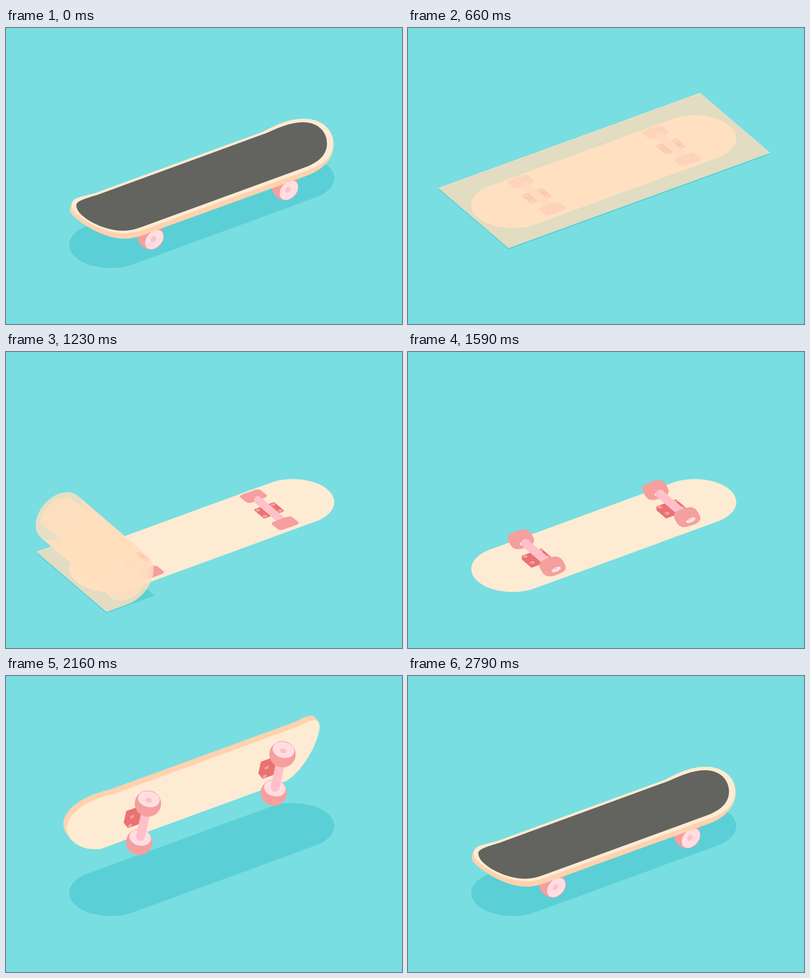
An HTML page that plays this animation: 800x600 px, repeating every 3000 ms.

```html
<!DOCTYPE html>
<html lang="en">
<head>
<meta charset="utf-8">
<title>Skateboard</title>
<style>
html, body { margin: 0; width: 100%; height: 100%; overflow: hidden; background: #78dee1; }
svg { display: block; width: 100vw; height: 100vh; }
</style>
</head>
<body>
<svg id="stage" viewBox="0 0 800 600"></svg>
<script>
const stage = document.getElementById('stage');
const LOOP = 3000;
const SHADE = '#5acfd6', CREAM = '#feebd3', WOOD = '#ffd2ae', GRIP = '#63645f';
const TIRE = '#f59f9f', FACE = '#ffdee3', AXLE = '#ffc0c9', BASE = '#eb7272', SHEET = '#ffe0bf';

// Screen vectors of one board unit: length, width, up
const U = [0.7, -0.257], W = [0.457, 0.392], UP = [0, -0.69];
const CX = 395.5, GROUND = 372, REST = 303, PEAK = 224;

const clamp = v => Math.max(0, Math.min(1, v));
const span = (t, a, b) => clamp((t - a) / (b - a));
const mix = (a, b, k) => a + (b - a) * k;
const sine = p => (1 - Math.cos(Math.PI * p)) / 2;
const cubic = p => p < 0.5 ? 4 * p ** 3 : 1 - 4 * (1 - p) ** 3;
const blend = (a, ka, b, kb) => [a[0] * ka + b[0] * kb, a[1] * ka + b[1] * kb];
const num = v => v.toFixed(2);
const group = (tf, body) => `<g transform="${tf}">${body}</g>`;
const path = (d, fill, more = '') => `<path d="${d}" fill="${fill}" ${more}/>`;
const poly = (pts, fill, more = '') =>
  path('M' + pts.map(p => num(p[0]) + ',' + num(p[1])).join('L') + 'Z', fill, more);
const disc = (c, a, b, r, fill) =>
  `<circle r="${r}" fill="${fill}" transform="matrix(${[...a, ...b, ...c].map(v => v.toFixed(4))})"/>`;

const outline = [];
for (let i = 0; i < 72; i++) {
  const a = (i + 0.5) / 72 * 2 * Math.PI - Math.PI / 2;
  const side = Math.cos(a) > 0 ? 1 : -1;
  outline.push([side * 263 + 100 * Math.cos(a), 100 * Math.sin(a)]);
}

const shadow = () => poly(outline.map(([x, y]) => {
  const v = blend(U, x, W, y);
  return [CX + v[0], GROUND + v[1]];
}), SHADE);

// Wheel body: flat rounded slab at k = 0, round at k = 1
function tire(c, k) {
  const p = [mix(20.5, 25, k), mix(-7.5, -9, k)], q = [mix(10, 9, k), mix(8, 25, k)];
  const e = mix(0.36, 1, k), pts = [];
  const bend = v => Math.sign(v) * Math.abs(v) ** e;
  for (let i = 0; i < 72; i++) {
    const a = i / 72 * 2 * Math.PI;
    const v = blend(p, bend(Math.cos(a)), q, bend(Math.sin(a)));
    pts.push([c[0] + v[0], c[1] + v[1]]);
  }
  return poly(pts, TIRE);
}

function frontWheel(x, y) {
  return tire([x, y], 1) + disc([x + 7.5, y + 6.5], U, UP, 26.5, FACE) +
    disc([x + 5.7, y + 5.5], U, UP, 8.3, AXLE);
}

// Board seen from below; phi turns it about its long axis
function underside(yc, phi, k, thick) {
  const s = Math.sin(phi), co = Math.cos(phi);
  const across = blend(W, co, UP, -s), out = blend(UP, co, W, s);
  const kick = 40 * sine(clamp(phi / 1.1));
  const at = (x, y, z) => [
    CX + U[0] * x + across[0] * y + out[0] * z,
    yc + U[1] * x + across[1] * y + out[1] * z
  ];
  const layer = (z, fill) => poly(outline.map(([x, y]) =>
    at(x, y, z - kick * Math.max(0, (Math.abs(x) - 190) / 173) ** 2)), fill);

  let art = '';
  if (thick > 0.1) for (let i = 0; i < 7; i++) art += layer(-thick * (1 - i / 7), WOOD);
  art += layer(0, CREAM);

  const near = 58 * co - 47 * s > 0 ? 1 : -1;
  const h = 35.5 * k, mid = -4;
  const wheel = (x, y) => {
    let w = tire(at(x, y, h), k);
    if (k > 0.02) {
      w += disc(at(x, y + 16 * near, h), U, out.map(v => v * k), 26.5 * k, FACE);
      w += disc(at(x, y + 12.5 * near, h), U, out.map(v => v * k), 8.3 * k, AXLE);
    }
    return w;
  };
  for (const x of [197.5, -191]) {
    for (let i = 0; i <= 5; i++) {
      const z = 17 * k * i / 5;
      art += poly([[-27, -20], [27, -20], [27, 20], [-27, 20]].map(p => at(x - 2 + p[0], mid + 2 + p[1], z)),
        BASE, `stroke="${BASE}" stroke-width="3" stroke-linejoin="round"`);
    }
    for (const bx of [-22, 22]) for (const by of [-16, 16])
      art += disc(at(x - 2 + bx, mid + 2 + by, 17 * k), U, across, 6, TIRE);
    const a = at(x, mid - 50 * near, h), b = at(x, mid + 66 * near, h);
    art += wheel(x, mid - 70 * near);
    art += `<line x1="${num(a[0])}" y1="${num(a[1])}" x2="${num(b[0])}" y2="${num(b[1])}" ` +
      `stroke="${AXLE}" stroke-width="${num(mix(16, 18, k))}" stroke-linecap="round"/>`;
    art += wheel(x, mid + 70 * near);
  }
  return art;
}

const upright =
  frontWheel(564, 322.5) + frontWheel(292, 422.5) +
  path('M129,369C130,360 132,352 139,347C150,341 166,339 182,334L520,210C545,197 570,184 602,184' +
    'C640,184 662,208 662,236C662,263 643,287 606,300L272,421.5C260,425 250,427 238,427' +
    'C200,427 152,399 132,377Q129,373 129,369Z', WOOD) +
  path('M133,359C134,352 136,349 140,346.5C150,341 166,339 182,334L520,210C545,197 570,184 602,184' +
    'C640,184 661,208 661,233C661,262 641,277 611,288L274,410C260,415 250,416 238,416' +
    'C202,416 157,393 138,372Q133,366 133,359Z', CREAM) +
  path('M142,359C143,350 160,346 188,337L526,213C550,202 575,191 600,191C632,191 648.5,212 648.5,234' +
    'C648.5,257 632,271 608,281L275,403C257,409.5 247,411 236,411C205,411 165,394 148,374' +
    'Q142,366 142,359Z', GRIP);

// Upright art squashed along its width while the flip ends
function topside(yc, phi) {
  const w = blend(W, -Math.cos(phi), UP, Math.sin(phi));
  const det = U[0] * W[1] - U[1] * W[0];
  const m = [
    (U[0] * W[1] - w[0] * U[1]) / det, (U[1] * W[1] - w[1] * U[1]) / det,
    (w[0] - W[0]) * U[0] / det, (w[1] * U[0] - U[1] * W[0]) / det
  ];
  return group(`translate(${CX} ${num(yc)}) matrix(${m.map(v => v.toFixed(4))},0,0) translate(${-CX} ${-REST})`, upright);
}

const LEN = 529, SIDE = [142, 122], TILT = 0.365;
const far = (s, up) => [61 + s, 405 - TILT * s - up];
const ribbon = edge => [...edge, ...edge.map(p => [p[0] + SIDE[0], p[1] + SIDE[1]]).reverse()];

// The roll gets thicker as it takes up film
function sheetSize(c) {
  const fade = c < 0 ? clamp(1 + c / 57) : 1;
  const full = clamp((LEN - c) / 480);
  return { r: mix(47.3, 53, full) * fade, h: mix(36.7, 53, full) * fade };
}

function sheetShadow(c) {
  const { r } = sheetSize(c);
  if (r < 0.6) return '';
  const end = Math.min(LEN, c + r);
  return poly(ribbon([far(Math.min(0, c), -2.5), far(end, -2.5)]), SHADE);
}

// Film flat up to c, wound beyond it in a spiral that tightens inward
function sheet(c) {
  const { r, h } = sheetSize(c);
  if (r < 0.6) return '';
  const tight = a => 1 - 0.03 * a;
  const wound = (LEN - Math.max(0, c)) / r;
  const last = Math.min((1 - Math.sqrt(Math.max(0, 1 - 0.06 * wound))) / 0.03, 12);
  const turn = Math.PI - Math.atan2(173.8 * r, 142 * h);
  let art = '', from = 0, to = turn;
  for (;;) {
    const stop = Math.min(to, last), edge = [];
    if (from === 0 && c > 0) edge.push(far(0, 0));
    for (let i = 0; i <= 24; i++) {
      const a = mix(from, stop, i / 24), g = tight(a);
      edge.push(far(c + r * g * Math.sin(a), h * (1 - g * Math.cos(a))));
    }
    art += poly(ribbon(edge), SHEET, 'fill-opacity=".82"');
    if (to >= last) return art;
    from = to;
    to += Math.PI;
  }
}

function rideX(t) {
  if (t < 270) return -69 * sine(span(t, 180, 270));
  return -69 + 768 * (1 - (1 - span(t, 270, 690)) ** 3);
}

function scene(t) {
  if (t < 555) {
    const x = rideX(t);
    return group(`translate(${num(x)} ${num(-0.368 * x)})`, shadow() + upright);
  }
  const k = sine(span(t, 1400, 1780));
  if (t < 1440) {
    const drop = -560 * (1 - span(t, 540, 735)) ** 2;
    const c = LEN - 586 * sine(span(t, 739, 1416));
    return group(`translate(0 ${num(drop)})`,
      sheetShadow(c) + underside(GROUND, 0, k, 0) + sheet(c));
  }
  const rise = 1 - (1 - span(t, 1790, 2300)) ** 2.4;
  const yc = t < 2340 ? mix(GROUND, PEAK, rise) : mix(PEAK, REST, cubic(span(t, 2340, 2790)));
  const phi = Math.PI * sine(span(t, 1930, 2345));
  const board = phi < 2.46
    ? underside(yc, phi, k, 16 * clamp((GROUND - yc) / 40))
    : topside(yc, phi);
  return (t < 1790 ? '' : shadow()) + board;
}

function draw(now) {
  stage.innerHTML = '<rect width="800" height="600" fill="#78dee1"/>' + scene(now % LOOP);
}

const start = performance.now();
function tick() {
  draw(performance.now() - start);
  requestAnimationFrame(tick);
}
tick();
</script>
</body>
</html>
```
